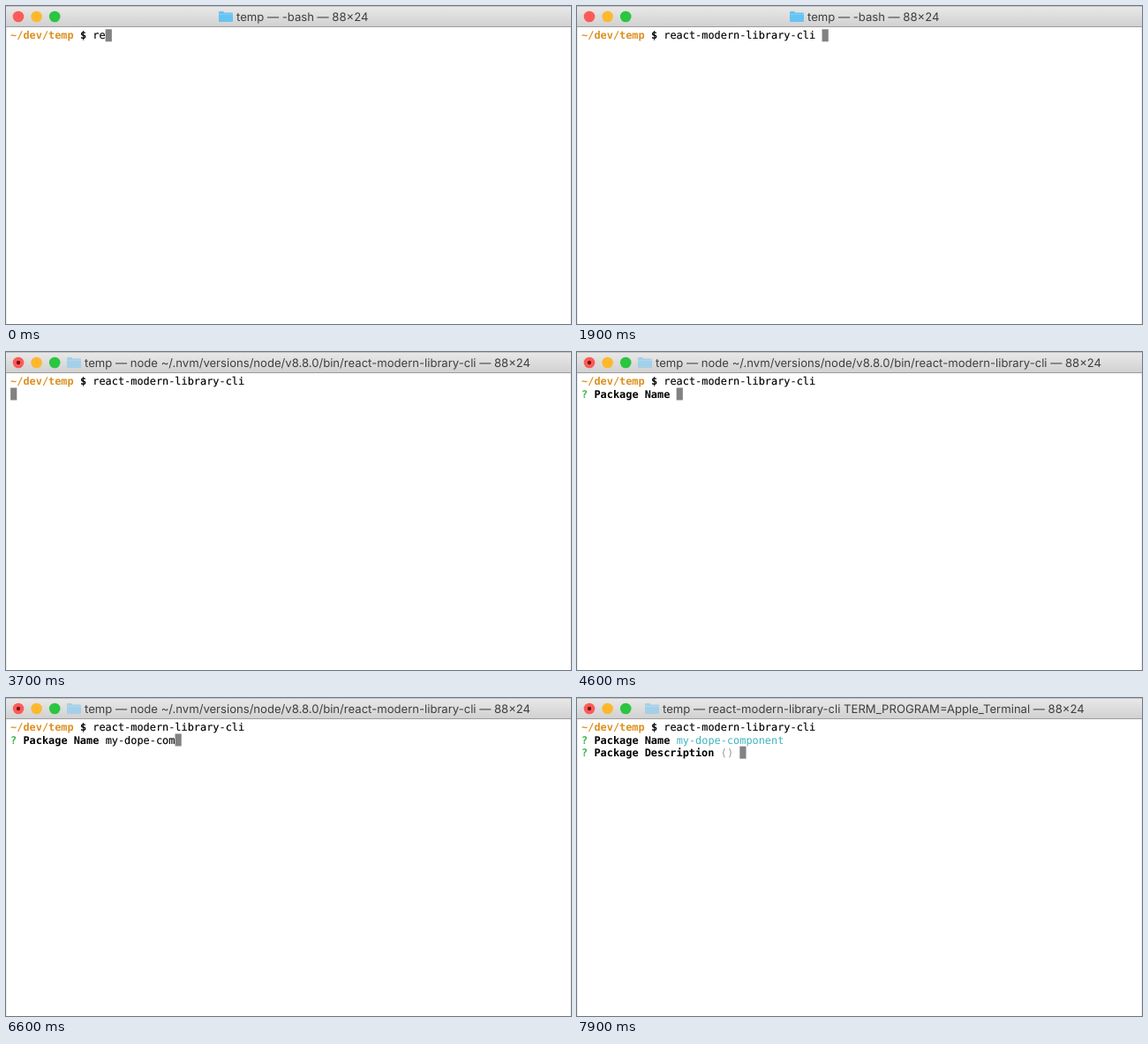
These frames come from a looping animation (640x360 px, 8 s). An HTML page:

```html
<!DOCTYPE html>
<html lang="en">
<head>
<meta charset="utf-8">
<title>Terminal</title>
<style>
  html, body { margin: 0; width: 100%; height: 100%; overflow: hidden; background: #fff; }
  svg { display: block; width: 640px; height: 360px; }
  text { white-space: pre; text-rendering: geometricPrecision; }
  #title { font: 13.1px Inter, "Open Sans", sans-serif; fill: #3e3e3e; }
  #screen { font: 11.9px "DejaVu Sans Mono", monospace; fill: #000; }
  .plain { stroke: #000; stroke-width: .15px; }
  .bold { font-weight: bold; }
  .path { fill: #dc9020; }
  .mark { fill: #3db54a; }
  .answer { fill: #3fb4bd; }
  .hint { fill: #999; }
</style>
</head>
<body>
<svg viewBox="0 0 640 360">
  <defs>
    <linearGradient id="bar" x2="0" y2="1">
      <stop offset="0" stop-color="#e9e9e9"/>
      <stop offset="1" stop-color="#d1d1d1"/>
    </linearGradient>
  </defs>
  <rect width="640" height="360" fill="#fff"/>
  <path d="M.25 24V360M639.75 24V360" stroke="#ccc" stroke-width=".5"/>
  <rect width="640" height="23" fill="url(#bar)"/>
  <rect width="640" height="1" fill="#c2c2c2"/>
  <rect y="23" width="640" height="1" fill="#9c9c9c"/>
  <circle cx="14" cy="12" r="6.3" fill="#fc5b57"/>
  <circle cx="34.6" cy="12" r="6.3" fill="#fdb82e"/>
  <circle cx="55.2" cy="12" r="6.3" fill="#2ac640"/>
  <circle id="busy" cx="14" cy="12" r="2.2" fill="#7c130f"/>
  <g id="folder">
    <path d="M0 1.2Q0 0 1.2 0H5L6.4 1.5H14.8Q16 1.5 16 2.7V11Q16 12 15 12H1Q0 12 0 11Z"/>
    <path d="M0 3.4H16" stroke="#fff" stroke-opacity=".25" stroke-width=".7"/>
  </g>
  <text id="title" y="17"></text>
  <rect id="cursor" width="7.2" height="14" fill="#828282"/>
  <g id="screen"></g>
</svg>
<script>
const LOOP = 8000, LEFT = 5.1, TOP = 26.3, COL = 7.17, ROW = 14.2;
const COMMAND = 'react-modern-library-cli';
const ANSWER = 'my-dope-component';

// Moments in ms at which the session moves on
const COMPLETE = 900, ENTER = 2100, LAUNCH = 2300, ASK = 4600;
const TYPE = 5500, RETITLE = 7000, ACCEPT = 7500;

const titles = [
  [0, 261, 'temp — -bash — 88×24'],
  [LAUNCH, 89, `temp — node ~/.nvm/versions/node/v8.8.0/bin/${COMMAND} — 88×24`],
  [RETITLE, 97, `temp — ${COMMAND} TERM_PROGRAM=Apple_Terminal — 88×24`]
];

const el = id => document.getElementById(id);
const typed = (word, ms) => word.slice(0, Math.max(0, Math.floor(ms / 100)));

function commandAt(t) {
  if (t >= COMPLETE) return COMMAND + ' ';
  return typed('react-mo', t + 200);
}

function linesAt(t) {
  const lines = [[['~/dev/temp', 'bold path'], [' $ ', 'bold'], [commandAt(t), 'plain']]];
  if (t < ENTER) return lines;
  if (t < ASK) return [...lines, []];
  const done = t >= ACCEPT;
  lines.push([['?', 'bold mark'], [' Package Name ', 'bold'],
    [typed(ANSWER, t - TYPE), done ? 'answer' : 'plain']]);
  if (done) lines.push([['?', 'bold mark'], [' Package Description ', 'bold'], ['() ', 'hint']]);
  return lines;
}

function drawScreen(lines) {
  let html = '', col = 0;
  lines.forEach((runs, row) => {
    col = 0;
    for (const [text, style] of runs) {
      html += `<text class="${style}" x="${LEFT + col * COL}" y="${TOP + row * ROW + 11}">${text}</text>`;
      col += text.length;
    }
  });
  el('screen').innerHTML = html;
  el('cursor').setAttribute('x', LEFT + col * COL);
  el('cursor').setAttribute('y', TOP + (lines.length - 1) * ROW);
}

function drawTitle(t) {
  const [, x, text] = titles.filter(([start]) => t >= start).pop();
  const busy = t >= LAUNCH;
  el('title').setAttribute('x', x);
  el('title').textContent = text;
  el('folder').setAttribute('transform', `translate(${x - 20} 6)`);
  el('folder').setAttribute('fill', busy ? '#a3d0e8' : '#67c3f3');
  el('busy').setAttribute('visibility', busy ? 'visible' : 'hidden');
}

let shown = '';
function frame() {
  const t = performance.now() % LOOP;
  const lines = linesAt(t);
  const key = JSON.stringify(lines) + (t >= LAUNCH) + (t >= RETITLE);
  if (key !== shown) {
    shown = key;
    drawScreen(lines);
    drawTitle(t);
  }
  requestAnimationFrame(frame);
}
frame();
</script>
</body>
</html>
```
